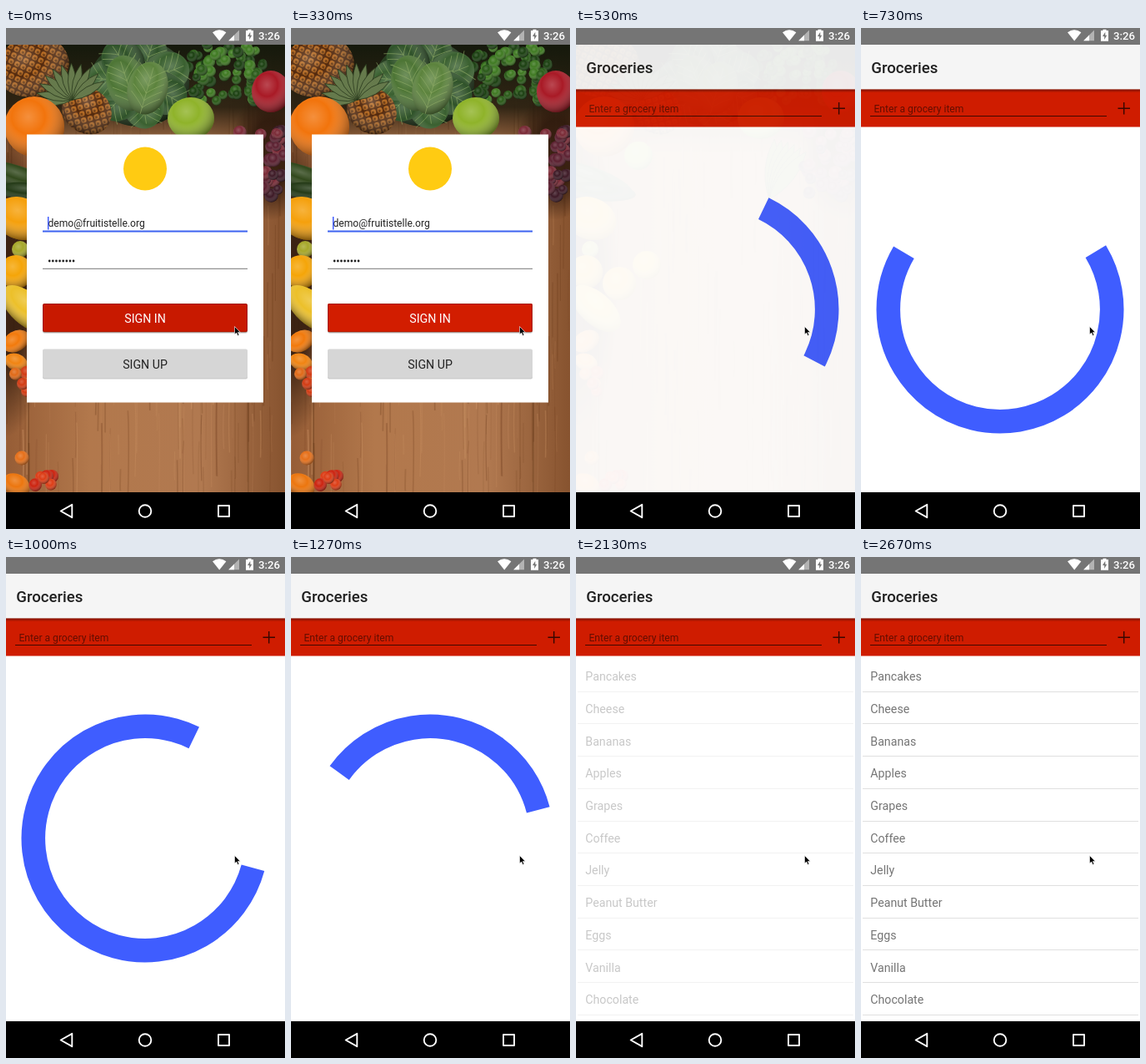
Animation of 335x600 px, one loop 2.94 s. Source, as an HTML page:

```html
<!DOCTYPE html>
<html lang="en">
<head>
<meta charset="utf-8">
<title>Groceries</title>
<style>
  html, body { margin: 0; width: 100%; height: 100%; overflow: hidden; background: #000; }
  svg { display: block; width: 335px; height: 600px; }
  text { font: 14.2px Roboto, sans-serif; white-space: pre; }
  .mid { text-anchor: middle; }
  .field { font-size: 12.1px; }
  .title { font-size: 18.6px; font-weight: 500; }
  .clock { font-size: 13.2px; font-weight: 500; }
  #items text { fill: #757575; }
  #items path { stroke: #e0e0e0; }
</style>
</head>
<body>
<svg viewBox="0 0 335 600">
  <defs>
    <linearGradient id="wood">
      <stop offset="0" stop-color="#965d36"/>
      <stop offset=".3" stop-color="#b2784c"/>
      <stop offset=".7" stop-color="#b17950"/>
      <stop offset="1" stop-color="#87532f"/>
    </linearGradient>
    <linearGradient id="shade" x2="0" y2="1">
      <stop offset="0" stop-color="#15190c"/>
      <stop offset=".14" stop-color="#241d0f" stop-opacity=".9"/>
      <stop offset=".24" stop-color="#3a2412" stop-opacity="0"/>
    </linearGradient>
    <radialGradient id="gap">
      <stop offset=".5" stop-color="#2c180c" stop-opacity=".85"/>
      <stop offset="1" stop-color="#2c180c" stop-opacity="0"/>
    </radialGradient>
    <linearGradient id="drop" x2="0" y2="1">
      <stop offset="0" stop-opacity=".4"/>
      <stop offset="1" stop-opacity="0"/>
    </linearGradient>
    <radialGradient id="gloss" cx=".4" cy=".34" r=".7">
      <stop offset="0" stop-color="#fff" stop-opacity=".2"/>
      <stop offset=".4" stop-color="#fff" stop-opacity="0"/>
      <stop offset="1" stop-opacity=".5"/>
    </radialGradient>
    <pattern id="rind" width="8" height="8" patternUnits="userSpaceOnUse" patternTransform="rotate(40)">
      <rect width="8" height="8" fill="#52280c"/>
      <rect x=".8" y=".8" width="6.200" height="6.200" rx="2.500" fill="#b56a22"/>
      <circle cx="4.500" cy="4.500" r="1.600" fill="#6a3a12"/>
    </pattern>
    <clipPath id="stage"><path d="M0 20H335V556H0Z"/></clipPath>
  </defs>

  <g clip-path="url(#stage)">
    <g id="photo">
      <rect y="20" width="335" height="536" fill="url(#wood)"/>
      <g id="grain" fill="none"></g>
      <rect y="20" width="335" height="536" fill="url(#shade)"/>
      <ellipse cy="300" rx="52" ry="190" fill="url(#gap)"/>
      <ellipse cx="318" cy="150" rx="48" ry="80" fill="url(#gap)"/>
      <g id="food"></g>
    </g>

    <g id="card">
      <rect x="25" y="127.5" width="284" height="321" fill="#fff"/>
      <circle cx="167" cy="168.5" r="26" fill="#ffcb12"/>
      <text class="field" x="50.5" y="238" fill="#222">demo@fruitistelle.org</text>
      <path d="M50.7 226V241.5" stroke="#3d5afe" stroke-width="1.5"/>
      <path d="M44 243.5H290" stroke="#3d63f0" stroke-width="1.8"/>
      <path d="M52.2 279H82" stroke="#222" stroke-width="2.8" stroke-linecap="round" stroke-dasharray="0 4.12"/>
      <path d="M44 288.3H290" stroke="#777"/>
      <rect x="44" y="331.5" width="246" height="34" rx="2" opacity=".25"/>
      <rect x="44" y="330" width="246" height="34" rx="2" fill="#c81900"/>
      <rect id="press" x="44" y="330" width="246" height="34" rx="2" fill="#d21d00"/>
      <rect x="44.5" y="330.5" width="245" height="33.5" rx="2" fill="none" stroke="#7a1a0a" stroke-opacity=".5"/>
      <text class="mid" x="167" y="352.8" fill="#fff">SIGN IN</text>
      <rect x="44" y="386" width="246" height="34.5" rx="2" opacity=".2"/>
      <rect x="44" y="384.5" width="246" height="34.5" rx="2" fill="#d6d6d6"/>
      <text class="mid" x="167" y="407.5" fill="#222">SIGN UP</text>
    </g>

    <g id="page">
      <rect y="20" width="335" height="536" fill="#fff"/>
      <rect y="73" width="335" height="45.5" fill="#cf1c00"/>
      <rect y="20" width="335" height="53.5" fill="#f5f5f5"/>
      <rect y="73.5" width="335" height="4" fill="url(#drop)"/>
      <text class="title" x="12.3" y="54" fill="#212121">Groceries</text>
      <text class="field" x="15.5" y="101.2" fill="#000" fill-opacity=".52">Enter a grocery item</text>
      <path d="M11 105.5H295" stroke="#400800"/>
      <path d="M308.5 96.3H323M315.7 89V103.5" stroke="#3a0700" stroke-width="1.5"/>
      <g id="items"></g>
      <circle id="ring" cx="167" cy="337" r="134.2" fill="none" stroke="#3f5dff" stroke-width="28.6" pathLength="360"/>
    </g>
  </g>

  <rect width="335" height="20" fill="#757575"/>
  <g fill="#fff">
    <path d="M248 5.3Q256.200 -.6 264.400 5.300L256.200 15.400Z"/>
    <path d="M280 2.500V15.300H267.200Z" opacity=".45"/>
    <path d="M274 8.500V15.300H267.200Z"/>
    <path d="M290.500 3V1.800H294.500V3H297V15.800H288V3Z"/>
    <text class="clock" x="303" y="14.3">3:26</text>
  </g>
  <path d="M293.300 4.800L290 10H292.200V14L295.200 8.700H293.300Z" fill="#757575"/>

  <rect y="556" width="335" height="44" fill="#000"/>
  <g fill="none" stroke="#fff" stroke-width="1.9" stroke-linejoin="round">
    <path d="M79.300 570.800V586.200L65.700 578.500Z"/>
    <circle cx="167" cy="578.500" r="7.300"/>
    <rect x="255" y="572" width="13" height="13"/>
  </g>

  <path d="M274.500 357.500V367L276.700 365L278.300 368.500L279.900 367.800L278.400 364.400H281.300Z" stroke="#fff" stroke-width=".6"/>
</svg>

<script>
const $ = id => document.getElementById(id);

function add(parent, tag, attrs, text) {
  const el = document.createElementNS("http://www.w3.org/2000/svg", tag);
  for (const key in attrs) el.setAttribute(key, attrs[key]);
  if (text) el.textContent = text;
  parent.append(el);
  return el;
}

let seed = 7;
const rand = () => (seed = seed * 16807 % 2147483647) / 2147483647;

// Backdrop: wood grain and simple produce
const food = $("food");

function blob(fill, cx, cy, rx, ry = rx, turn = 0) {
  const shape = { cx, cy, rx, ry, transform: `rotate(${turn} ${cx} ${cy})` };
  add(food, "ellipse", { ...shape, fill });
  add(food, "ellipse", { ...shape, fill: "url(#gloss)" });
}

// A fan of pointed leaves around one root
function crown(cx, cy, size, fill, count, from, to) {
  for (let i = 0; i < count; i++) {
    const turn = from + (to - from) * i / (count - 1);
    add(food, "path", {
      d: `M${cx} ${cy}q${-size * .22} ${-size * .5} 0 ${-size}q${size * .22} ${size * .5} 0 ${size}`,
      fill, stroke: "#26351a", "stroke-width": .7, transform: `rotate(${turn} ${cx} ${cy})`
    });
  }
}

// A round leaf with a pale midrib and side veins, tip pointing up before the turn
function leaf(fill, cx, cy, rx, ry, turn) {
  blob(fill, cx, cy, rx, ry, turn);
  let d = `M${cx} ${cy + ry}V${cy - ry * .8}`;
  for (let i = -2; i < 3; i++) {
    const y = cy - i * ry * .28;
    d += `M${cx - rx * .75} ${y - ry * .3}Q${cx - rx * .2} ${y} ${cx} ${y + ry * .2}` +
      `Q${cx + rx * .2} ${y} ${cx + rx * .75} ${y - ry * .3}`;
  }
  add(food, "path", {
    d, fill: "none", stroke: "#8fab67", "stroke-width": .9, opacity: .65,
    transform: `rotate(${turn} ${cx} ${cy})`
  });
}

function scatter(count, x, y, w, h, r, fills) {
  for (let i = 0; i < count; i++)
    blob(fills[i % fills.length], x + rand() * w, y + rand() * h, r * (.8 + rand() * .4));
}

for (let i = 0; i < 240; i++) {
  add($("grain"), "path", {
    d: `M${rand() * 335} ${rand() * 536}q${rand() * 4 - 2} 30 0 ${20 + rand() * 110}`,
    stroke: i % 3 ? "#6a3a1a" : "#d39a6a",
    "stroke-width": .5 + rand() * 1.6, opacity: .1 + rand() * .25
  });
}
for (const x of [27, 291])
  add($("grain"), "path", { d: `M${x} 20V556`, stroke: "#5e3515", "stroke-width": 1.2, opacity: .6 });

scatter(80, 215, 18, 95, 72, 6, ["#2a5a18", "#3f7a22", "#1b4011"]);
blob("url(#rind)", 32, 46, 44, 36, -15);
blob("#1d3416", 160, 66, 60, 52);
for (let i = 0; i < 7; i++) {
  const a = i * Math.PI * 2 / 7 + .3;
  leaf(i % 2 ? "#3a6030" : "#2f5229", 160 + 34 * Math.sin(a), 64 - 28 * Math.cos(a), 25, 29, a * 180 / Math.PI);
}
leaf("#4d7535", 146, 66, 25, 34, -18);
leaf("#5c833d", 170, 72, 24, 32, 16);
blob("url(#rind)", 97, 99, 31, 27, 35);
crown(80, 86, 44, "#667a4c", 11, -95, 60);
blob("#f2740c", 34, 118, 36);
blob("#9fb43a", 75, 153, 17);
blob("#8fb32a", 222, 108, 28, 25);
blob("#a91a26", 318, 76, 23, 25);
crown(232, 205, 72, "#71833a", 6, 5, 38);
scatter(40, 274, 122, 62, 80, 7, ["#5b2030", "#7a2a36", "#3d1a26"]);
blob("#31481c", 20, 180, 50, 13, 20);
blob("#243a17", 30, 196, 42, 11, 5);
blob("#f5a00c", 17, 228, 32, 25, 20);
blob("#a7a82a", 17, 265, 10);
blob("#f5a508", 12, 292, 20);
blob("#f0a818", 52, 306, 20);
blob("#eeb127", 85, 284, 17);
blob("#ecc02a", 24, 336, 36, 19, 42);
blob("#f27a0c", 12, 375, 17, 12, -30);
blob("#f08412", 12, 400, 14, 10, 20);
scatter(5, 4, 412, 44, 30, 8, ["#d23c14", "#e06a18"]);
blob("#e6701a", 19, 515, 8.5);
blob("#ec760f", 12, 547, 17, 13, 25);
scatter(6, 34, 532, 28, 18, 7, ["#cc2410", "#dd3d16"]);

// Grocery list
const names = ["Pancakes", "Cheese", "Bananas", "Apples", "Grapes", "Coffee",
  "Jelly", "Peanut Butter", "Eggs", "Vanilla", "Chocolate"];
names.forEach((name, i) => {
  const y = 148.2 + i * 38.7;
  add($("items"), "text", { x: 11.3, y }, name);
  add($("items"), "path", { d: `M2 ${Math.floor(y + 13)}.5H333` });
});

// Motion
const LOOP = 2940, FPS = 15;
const clamp = v => Math.min(1, Math.max(0, v));

function curve(x, [a, b, c, d]) {
  let lo = 0, hi = 1;
  for (let i = 0; i < 30; i++) {
    const s = (lo + hi) / 2, r = 1 - s;
    const at = a * r ** 3 + 3 * b * s * r * r + 3 * c * s * s * r + d * s ** 3;
    if (at < x) lo = s; else hi = s;
  }
  return lo * lo * (3 - 2 * lo);
}
const headEase = u => u >= .5 ? 1 : curve(u, [0, .2, .1, .5]);
const tailEase = u => u <= .5 ? 0 : curve(u, [.5, .7, .6, 1]);

function spin(t) {
  const u = clamp((t - 350) / 1333);
  const tail = 270 * tailEase(u), head = 10.8 + 270 * headEase(u);
  const sway = t < 500 ? 0 : -3 * Math.sin(Math.PI * (t - 500) / 800);
  const turn = 14.4 + (t - 466.7) * (90 / 1333 + 720 / 6665) + sway;
  const ring = $("ring");
  ring.setAttribute("stroke-dasharray", `${head - tail} 360`);
  ring.setAttribute("transform", `rotate(${turn + tail - 90} 167 337)`);
  ring.style.display = t < 1720 ? "" : "none";
}

function draw(t) {
  const leaving = t > 350;
  $("card").style.display = leaving ? "none" : "";
  $("press").style.opacity = clamp(t / 300);
  $("page").style.opacity = leaving ? 1 - (1 - clamp((t - 313) / 284)) ** 2 : 0;
  $("items").style.opacity = (1 - Math.cos(Math.PI * clamp((t - 1700) / 1000))) / 2;
  spin(t);
}

function step(ms) {
  let k = Math.floor(ms * FPS / 1000 + .06);
  if (Math.round(k * 100 / FPS) * 10 > ms) k--;
  return Math.min(k, 40) * 1000 / FPS;
}

const start = performance.now();
function tick() {
  draw(step((performance.now() - start) % LOOP));
  requestAnimationFrame(tick);
}
tick();
</script>
</body>
</html>
```
